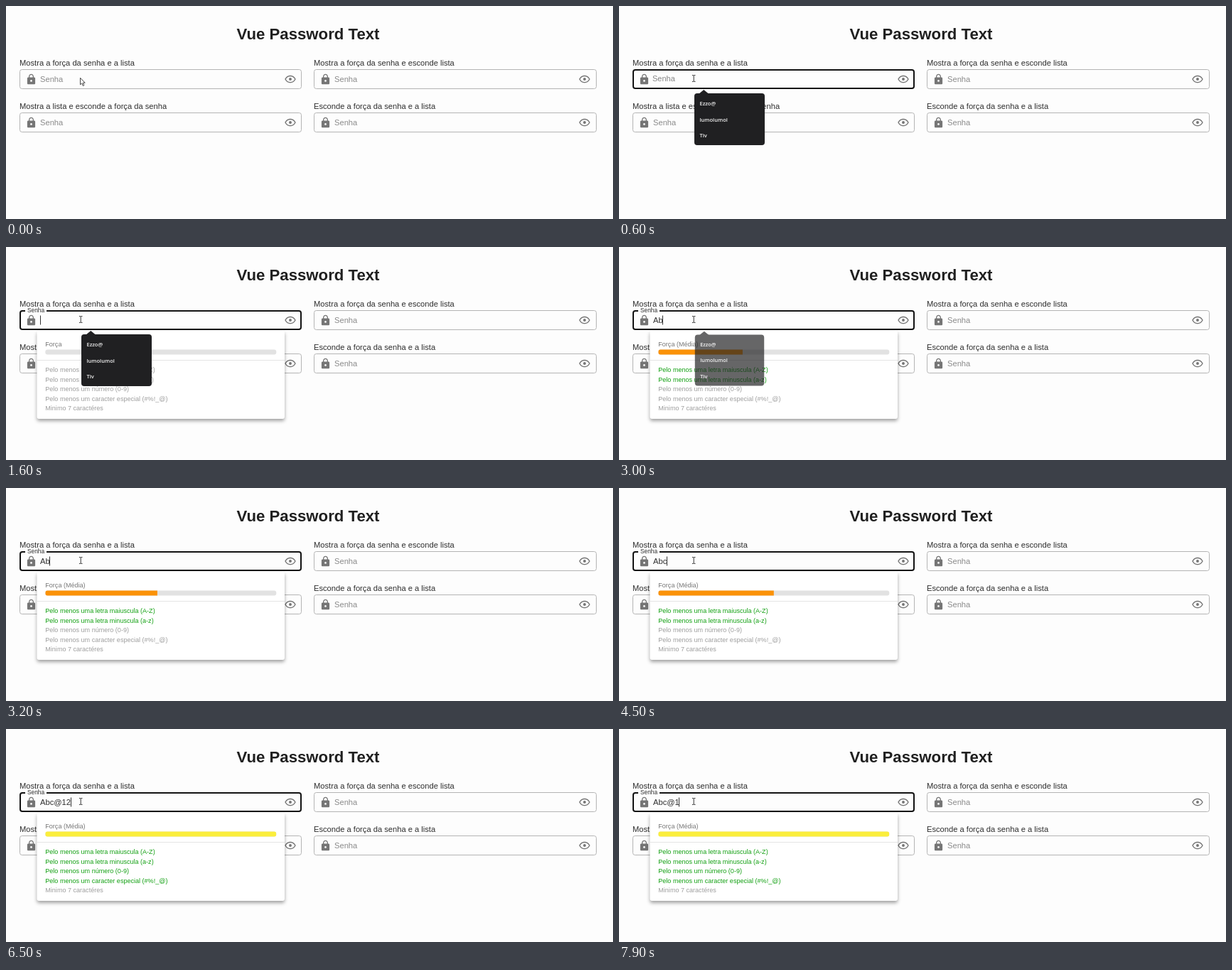
Animation, 854 px wide and 300 px high, one loop 8 s. Source, as an HTML page:

```html
<!DOCTYPE html>
<html lang="pt">
<head>
<meta charset="utf-8">
<title>Password text</title>
<style>
  html, body { margin: 0; width: 100%; height: 100%; overflow: hidden; background: #fdfdfd; }
  svg { display: block; width: 854px; height: 300px; }
  text { font-family: "Liberation Sans", Arial, sans-serif; font-size: 11.17px; fill: #2e2e2e; white-space: pre; }
  .title { font-size: 22.2px; font-weight: bold; fill: #202020; text-anchor: middle; }
  .hint { fill: #8a8a8a; }
  .box { fill: none; stroke: #b4b4b4; }
  .icon { fill: #757575; fill-rule: evenodd; }
  #card text { font-size: 9.05px; fill: #9e9e9e; }
  #card #force { fill: #777; }
  #card .ok { fill: #12a012; }
  #panel { fill: #fff; filter: drop-shadow(0 3px 2.5px rgba(0,0,0,.36)); }
  #saved text { font: 600 7.5px "Open Sans", sans-serif; fill: #f2f2f2; }
  #saved path, #saved rect { fill: #202022; }
</style>
</head>
<body>
<svg viewBox="0 0 854 300">
  <defs>
    <path id="lock" class="icon" transform="scale(.7) translate(-12 -11.5)" d="M18 8h-1V6c0-2.76-2.24-5-5-5S7 3.24 7 6v2H6c-1.1 0-2 .9-2 2v10c0 1.1.9 2 2 2h12c1.1 0 2-.9 2-2V10c0-1.1-.9-2-2-2zm-6 9c-1.1 0-2-.9-2-2s.9-2 2-2 2 .9 2 2-.9 2-2 2zm3.1-9H8.9V6c0-1.71 1.39-3.1 3.1-3.1s3.1 1.39 3.1 3.1z"/>
    <path id="eye" class="icon" transform="scale(.7) translate(-12 -11.5)" d="M12 6a9.77 9.77 0 0 1 8.82 5.5 9.65 9.65 0 0 1-17.64 0A9.77 9.77 0 0 1 12 6zM12 4C7 4 2.73 7.11 1 11.5 2.73 15.89 7 19 12 19s9.27-3.11 11-7.5C21.27 7.11 17 4 12 4zM12 8.7a2.8 2.8 0 1 1 0 5.6 2.8 2.8 0 0 1 0-5.6z"/>
    <clipPath id="track"><rect x="55.3" y="144.5" width="325" height="7" rx="3"/></clipPath>
  </defs>
  <text class="title" x="425" y="46.5">Vue Password Text</text>
  <g id="fields"></g>

  <g id="card">
    <rect id="panel" x="43.5" y="118" width="348.5" height="124" rx="3"/>
    <text id="force" x="55.3" y="140"></text>
    <g clip-path="url(#track)">
      <rect x="55" y="144" width="326" height="8" fill="#e2e2e2"/>
      <rect id="bar" x="55.3" y="144" height="8"/>
    </g>
    <path d="M43.5 159.5H392" stroke="#e4e4e4"/>
    <g id="rules"></g>
  </g>

  <rect id="active" class="box" rx="3"/>
  <rect id="gap" y="88" height="4" fill="#fdfdfd"/>
  <text id="label">Senha</text>
  <text id="typed" x="48" y="106.8"></text>
  <rect id="caret" y="96.5" width="1" height="13" fill="#333"/>

  <g id="saved">
    <path d="M112 124l7.3-6 7.3 6z"/>
    <rect x="106" y="123" width="99" height="73" rx="4"/>
    <text x="113.5" y="139.8">Ezzo@</text>
    <text x="113.5" y="162.5">lumolumol</text>
    <text x="113.5" y="185">Tiv</text>
  </g>

  <path id="arrow" d="M104.5 101.2v9.6l2.2-2 1.6 3.6 1.6-.7-1.6-3.5h2.9z" fill="#fff" stroke="#333" stroke-width=".9"/>
  <path id="beam" d="M103 97.5h1.5l.7.6.7-.6h1.5M105.2 98v8M103 106.500h1.500l.7-.6.7.6h1.500" fill="none" stroke="#333"/>
</svg>
<script>
const LOOP = 8000, STEP = 100;
const $ = id => document.getElementById(id);
const clamp = v => Math.max(0, Math.min(1, v));
const ease = v => { v = clamp(v); return v * v * (3 - 2 * v); };
const set = (el, attrs) => { for (const k in attrs) el.setAttribute(k, attrs[k]); };
const show = (id, on) => set($(id), { visibility: on ? 'visible' : 'hidden' });

const captions = [
  [19, 89, 'Mostra a força da senha e a lista'],
  [433, 89, 'Mostra a força da senha e esconde lista'],
  [19, 150, 'Mostra a lista e esconde a força da senha'],
  [433, 150, 'Esconde a força da senha e a lista']
];

$('fields').innerHTML = captions.map(([x, y, caption], i) => `
  <text x="${x}" y="${y - 4.6}">${caption}</text>
  ${i ? `<rect class="box" x="${x + .5}" y="${y + .5}" width="${x > 400 ? 397 : 396}" height="27" rx="3"/>
  <text class="hint" x="${x + 29}" y="${y + 17.8}">Senha</text>` : ''}
  <use href="#lock" x="${x + 16.5}" y="${y + 14}"/>
  <use href="#eye" x="${x + 381}" y="${y + 14}"/>`).join('');

const rules = [
  ['Pelo menos uma letra maiuscula (A-Z)', /[A-Z]/],
  ['Pelo menos uma letra minuscula (a-z)', /[a-z]/],
  ['Pelo menos um número (0-9)', /\d/],
  ['Pelo menos um caracter especial (#%!_@)', /[#%!_@]/],
  ['Minimo 7 caractéres', /.{7}/]
];
$('rules').innerHTML = rules.map(([text], i) =>
  `<text x="55.3" y="${176 + i * 13.5}">${text}</text>`).join('');
const ruleTexts = [...$('rules').children];

const keys = [
  [600, ''], [2100, 'A'], [3000, 'Ab'], [3500, 'Abc'], [5000, 'Abc@'], [5900, 'Abc@1'],
  [6500, 'Abc@12'], [6600, 'Abc@123'], [7600, 'Abc@12'], [7900, 'Abc@1']
];
const colors = ['#e2e2e2', '#f44336', '#fb9208', '#fdee2f', '#fbee3c', '#4caf50'];
const words = ['', ' (Fraca)', ' (Média)', ' (Média)', ' (Média)', ' (Forte)'];
const score = s => rules.filter(r => r[1].test(s)).length;
const share = s => Math.min(1, score(s) / 4);

function drawField(t) {
  const focus = t >= 500;
  const shade = Math.round(180 - 162 * clamp(t / 200));
  const inset = focus ? 1 : .5;
  set($('active'), {
    x: 19 + inset, y: 89 + inset, width: 397 - 2 * inset, height: 28 - 2 * inset,
    style: `stroke:rgb(${shade},${shade},${shade});stroke-width:${focus ? 2 : 1}`
  });
  const u = ease((t - 550) / 350);
  const tone = Math.round(138 - 90 * u);
  set($('label'), {
    x: 48 - 18 * u, y: 106.8 - 14.6 * u,
    style: `font-size:${11.17 - 2.8 * u}px;fill:rgb(${tone},${tone},${tone})`
  });
  set($('gap'), { x: 27, width: u > .3 ? 30 * u : 0 });
}

function drawInput(t) {
  const n = keys.findLastIndex(k => k[0] <= t);
  const [since, text] = keys[Math.max(0, n)];
  const before = n > 0 ? keys[n - 1][1] : '';
  const level = score(text);
  $('typed').textContent = text;
  const width = text ? $('typed').getComputedTextLength() : 0;
  $('caret').setAttribute('x', Math.round(48 + width - .3));
  show('caret', t >= 700 && (t - since) % 1000 < 500);

  // The bar eases to its new length over about 300 ms.
  const rest = 1 - clamp((t - since) / 300);
  const grow = 1 - .54 * rest * rest;
  const part = share(before) + (share(text) - share(before)) * grow;
  set($('bar'), { width: 325 * part, fill: colors[level] });
  $('force').textContent = 'Força' + words[level];
  ruleTexts.forEach((el, i) => el.classList.toggle('ok', rules[i][1].test(text)));
}

function drawLayers(t) {
  set($('card'), { opacity: ease((t - 650) / 450) });
  const out = clamp((t - 2930) / 220);
  const k = 1 - .05 * out;
  show('saved', t >= 600 && out < 1);
  set($('saved'), {
    opacity: 1 - out,
    transform: `translate(155.5 159.5) scale(${k}) translate(-155.5 -159.5)`
  });
  show('arrow', t < 100);
  show('beam', t >= 100);
}

function draw(ms) {
  const t = Math.floor(ms % LOOP / STEP) * STEP;
  drawField(t);
  drawInput(t);
  drawLayers(t);
}

const start = performance.now();
function tick() {
  draw(performance.now() - start);
  requestAnimationFrame(tick);
}
tick();
</script>
</body>
</html>
```
